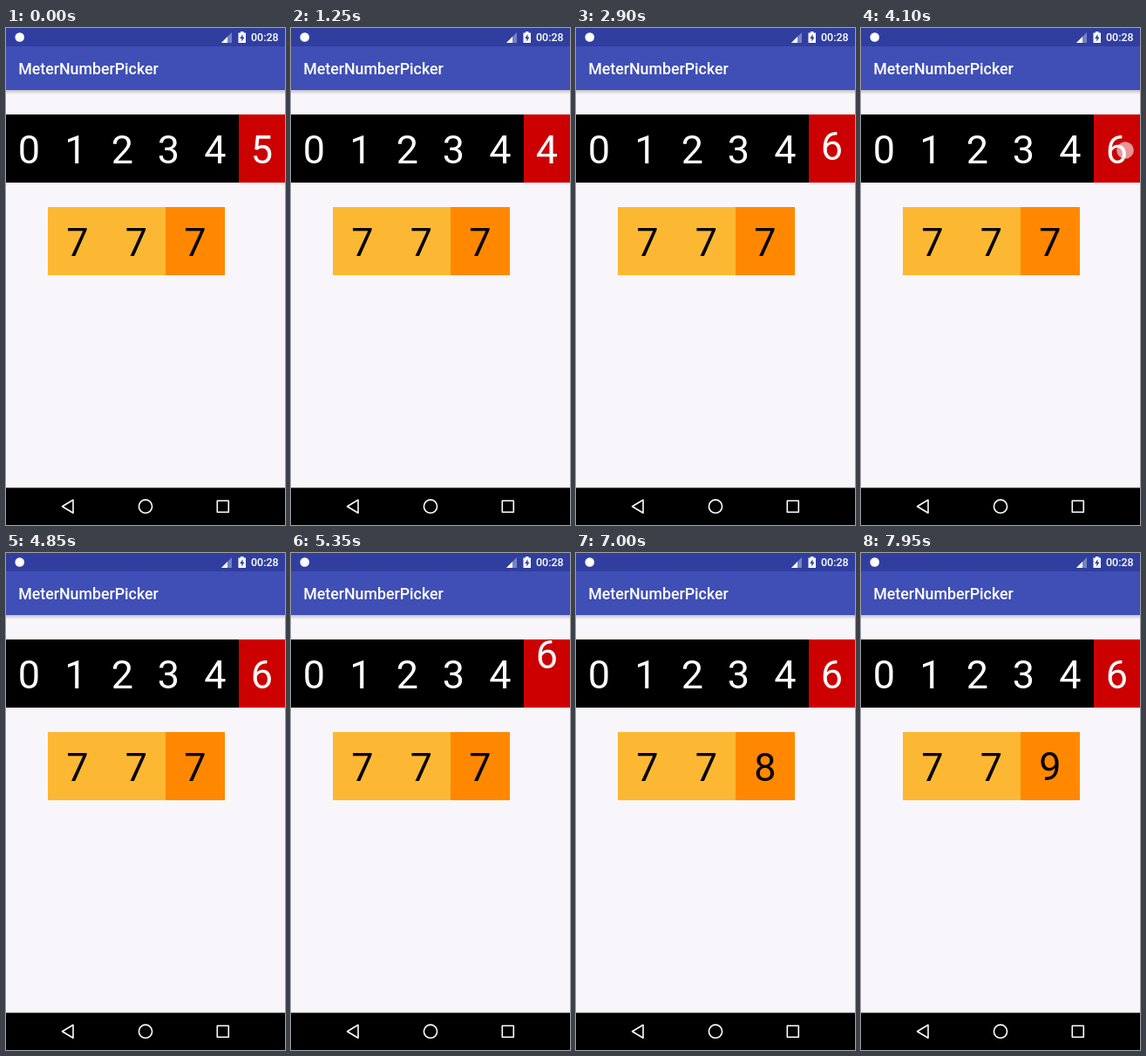
Recreate the animation shown at these times as an HTML page. Size 320 by 569 pixels, loop 8000 ms.

```html
<!DOCTYPE html>
<html lang="en">
<head>
<meta charset="utf-8">
<title>MeterNumberPicker</title>
<style>
  html, body { margin: 0; width: 100%; height: 100%; overflow: hidden; background: #f8f6fa; }
  svg { display: block; font-family: Roboto, sans-serif; }
  #stage { width: 100%; height: 100%; }
  .digits { font-size: 45px; text-anchor: middle; }
  .nav { fill: none; stroke: #fff; stroke-width: 1.6; stroke-linejoin: round; }
</style>
</head>
<body>
<svg id="stage" viewBox="0 0 320 569">
  <defs>
    <linearGradient id="shade" x2="0" y2="1">
      <stop offset="0" stop-opacity=".22"/>
      <stop offset="1" stop-opacity="0"/>
    </linearGradient>
  </defs>

  <rect y="71" width="320" height="5" fill="url(#shade)"/>
  <rect y="21" width="320" height="50" fill="#3f4fb5"/>
  <rect width="320" height="21" fill="#303f9f"/>
  <text x="14.2" y="53" font-size="17.78" font-weight="500" fill="#fff">MeterNumberPicker</text>

  <g fill="#fff">
    <circle cx="15.7" cy="10.5" r="5.3"/>
    <path d="M259 5V17H247Z" opacity=".35"/>
    <path d="M254 10V17H247Z"/>
    <path d="M266.5 5.5H269V4H272.5V5.5H275V17H266.5Z"/>
    <path d="M271.5 7L268.2 12H270.3V15.5L273.5 10.5H271.5Z" fill="#303f9f"/>
    <text x="281" y="15" font-size="12.44" font-weight="500">00:28</text>
  </g>

  <g id="meters"></g>

  <rect y="526.4" width="320" height="43"/>
  <g class="nav">
    <path d="M64.5 547.7L77 540.3V555.2Z"/>
    <circle cx="160" cy="547.7" r="7.6"/>
    <rect x="242.3" y="541.3" width="13" height="13"/>
  </g>

  <circle id="touch" r="9.6" fill="#fff" fill-opacity=".58" stroke="#aaa" stroke-opacity=".5"/>
</svg>
<script>
const LOOP = 8000, CELL = 78, DRAG = 380, SETTLE = 470;
const meters = document.getElementById("meters");
const touch = document.getElementById("touch");

// Adds a row of cells and returns a setter for the value of its last cell.
function addMeter(left, top, width, values, back, lastBack, ink) {
  const edge = i => Math.round(left + i * width / values.length);
  let strip;
  values.forEach((value, i) => {
    const w = edge(i + 1) - edge(i);
    const fill = i < values.length - 1 ? back : lastBack;
    const digits = Array.from({ length: 10 }, (_, n) =>
      `<text x="${w / 2}" y="${56 - n * CELL}">${n}</text>`).join("");
    meters.insertAdjacentHTML("beforeend",
      `<svg x="${edge(i)}" y="${top}" width="${w}" height="${CELL}" overflow="hidden">
        <rect width="${w}" height="${CELL}" fill="${fill}"/>
        <g class="digits" fill="${ink}">${digits}</g></svg>`);
    strip = meters.lastElementChild.lastElementChild;
    roll(strip, value);
  });
  return value => roll(strip, value);
}

function roll(strip, value) {
  strip.setAttribute("transform", `translate(0 ${value * CELL})`);
}

const setters = [
  addMeter(0, 99, 320, [0, 1, 2, 3, 4, 5], "#000", "#c00", "#fff"),
  addMeter(48, 205, 203, [7, 7, 7], "#fdb833", "#f80", "#000")
];

// A long swipe turns the wheel by one digit; a short one springs back.
const swipes = [
  { wheel: 0, press: 500, x: 302, y: 160, dy: -62 },
  { wheel: 0, press: 1350, x: 304, y: 118, dy: 67 },
  { wheel: 0, press: 2500, x: 303, y: 128, dy: 77 },
  { wheel: 0, press: 4100, x: 303, y: 140, dy: 17 },
  { wheel: 0, press: 4950, x: 306, y: 150, dy: -32 },
  { wheel: 1, press: 6300, x: 228, y: 250, dy: 75 },
  { wheel: 1, press: 7350, x: 228, y: 254, dy: 75 }
];

const smooth = k => k * k * (3 - 2 * k);
const settle = k => 1 - (1 - k) ** 4;

// A short dead zone passes before the wheel follows the finger.
const turn = d => Math.sign(d) * Math.max(0, Math.abs(d) - 4) / CELL;

function draw(t) {
  const value = [5, 7];
  let finger = null;
  for (const { wheel, press, x, y, dy } of swipes) {
    const age = t - press;
    if (age < 0) break;
    if (age < DRAG) {
      const d = dy * smooth(age / DRAG);
      finger = [x - d / 12, y + d];
      value[wheel] += turn(d);
    } else {
      const k = settle(Math.min(1, (age - DRAG) / SETTLE));
      const end = turn(dy);
      value[wheel] += end + (Math.round(end) - end) * k;
    }
  }
  setters.forEach((set, i) => set(value[i]));
  touch.setAttribute("visibility", finger ? "visible" : "hidden");
  if (finger) touch.setAttribute("transform", `translate(${finger})`);
}

const start = performance.now();
function frame() {
  draw((performance.now() - start) % LOOP);
  requestAnimationFrame(frame);
}
frame();
</script>
</body>
</html>
```
